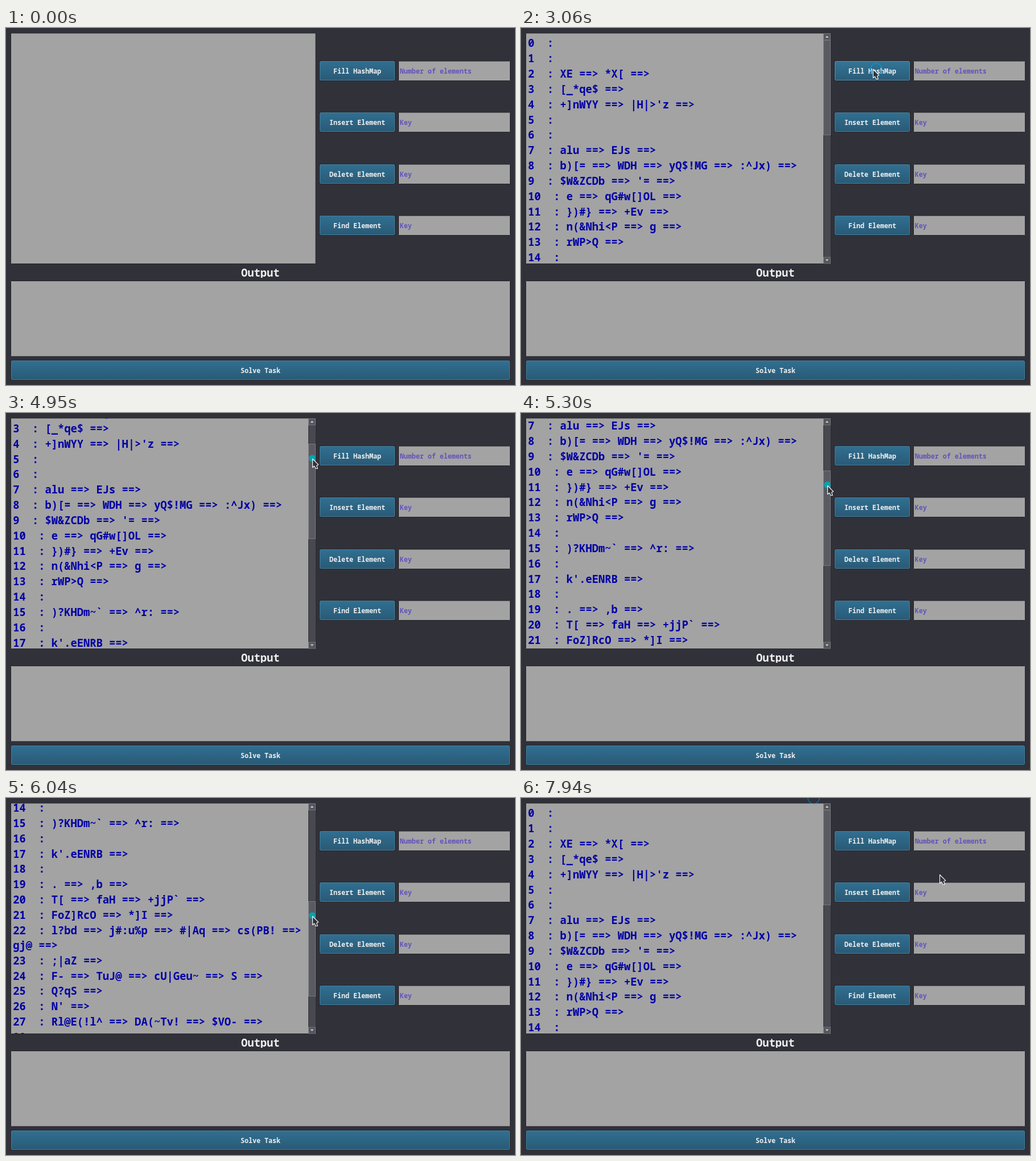
An HTML page that plays this animation: 894 px wide and 626 px high, repeating every 8000 ms.

```html
<!DOCTYPE html>
<html lang="en">
<head>
<meta charset="utf-8">
<title>HashMap demo</title>
<style>
html, body { margin: 0; width: 100%; height: 100%; overflow: hidden; background: #31313a; }
svg { display: block; }
text { font-family: "Noto Sans Mono", "DejaVu Sans Mono", monospace; font-weight: 700; white-space: pre; }
.small { font-size: 11.68px; }
.big { font-size: 18.78px; }
.label { fill: #f0f0f0; text-anchor: middle; }
.hint { fill: #6253bb; }
.typed { fill: #2410b0; }
.row { fill: #0000a5; }
.panel { fill: #a3a3a3; stroke: #24242a; }
.button { fill: url(#blue); stroke: #48809b; }
.button.hover { fill: url(#blueHover); stroke: #5795b2; }
</style>
</head>
<body>
<svg id="stage" width="894" height="626" viewBox="0 0 894 626">
  <defs>
    <linearGradient id="blue" x2="0" y2="1"><stop stop-color="#316f91"/><stop offset="1" stop-color="#295a76"/></linearGradient>
    <linearGradient id="blueHover" x2="0" y2="1"><stop stop-color="#347596"/><stop offset="1" stop-color="#2a5d79"/></linearGradient>
    <clipPath id="listClip"><rect x="9" y="9.5" width="522" height="403.5"/></clipPath>
    <clipPath id="titleClip"><rect x="400" y="416" width="100" height="22"/></clipPath>
  </defs>
  <rect width="894" height="626" fill="#31313a"/>
</svg>
<script>
const LOOP = 8000, FILL_AT = 2900, PRESS = 4700, RELEASE = 7700;
const MAX_SCROLL = 514, THUMB_TRAVEL = 213, ROW = 26.83;
const stage = document.getElementById("stage");

function add(tag, attrs, parent = stage, text) {
  const el = document.createElementNS("http://www.w3.org/2000/svg", tag);
  for (const k in attrs) el.setAttribute(k, attrs[k]);
  if (text !== undefined) el.textContent = text;
  parent.appendChild(el);
  return el;
}
const set = (el, attrs) => { for (const k in attrs) el.setAttribute(k, attrs[k]); };
const show = (el, on) => el.setAttribute("visibility", on ? "visible" : "hidden");
const clamp = (v, lo, hi) => Math.max(lo, Math.min(hi, v));
const panel = (x, y, w, h) => add("rect", { x: x - .5, y: y - .5, width: w + 1, height: h + 1, rx: 1, class: "panel" });

function button(x, y, w, label) {
  add("rect", { x: x - 1, y: y - 1, width: w + 2, height: 36, rx: 2, fill: "#25262d" });
  const box = add("rect", { x: x + .5, y: y + .5, width: w - 1, height: 33, rx: 1, class: "button" });
  add("text", { x: x + w / 2, y: y + 21.8, class: "small label" }, stage, label);
  return { box, x, y, w };
}

// Static window
panel(9, 9.5, 534.5, 403.5);
panel(9, 444, 876, 131.5);
add("text", { x: 446.7, y: 435.5, class: "big label", "clip-path": "url(#titleClip)" }, stage, "Output");
button(9, 583, 876, "Solve Task");

const actions = [["Fill HashMap", "Number of elements"], ["Insert Element", "Key"],
  ["Delete Element", "Key"], ["Find Element", "Key"]];
const controls = actions.map(([label, hint], i) => {
  const y = Math.round(58 + 90.35 * i);
  const btn = button(551, y, 132, label);
  const field = panel(690, y + .5, 195, 33.5);
  const text = add("text", { x: 691.7, y: y + 21.8, class: "small hint" }, stage, hint);
  return { btn, field, text };
});
const caret = add("rect", { x: 692, y: 67, width: 1, height: 16, fill: "#111" });

// Hash table listing
const buckets = ["", "", "XE *X[", "[_*qe$", "+]nWYY |H|>'z", "", "", "alu EJs",
  "b)[= WDH yQ$!MG :^Jx)", "$W&ZCDb '=", "e qG#w[]OL", "})#} +Ev", "n(&Nhi<P g", "rWP>Q", "",
  ")?KHDm~` ^r:", "", "k'.eENRB", "", ". ,b", "T[ faH +jjP`", "FoZ]RcO *]I",
  "l?bd j#:u%p #|Aq cs(PB! gj@", ";|aZ", "F- TuJ@ cU|Geu~ S", "Q?qS", "N'",
  "Rl@E(!l^ DA(~Tv! $VO-", "", "L,Qo ]g'QIThW", "R-sM:", "FEww*S$ )tYx<vz"];
const filled = add("g", {});
const view = add("g", { "clip-path": "url(#listClip)" }, filled);
const list = add("g", {}, view);
const WRAP_COL = 46;
let lineY = 33.4;
buckets.forEach((keys, i) => {
  const line = i + "  : " + keys.split(" ").filter(Boolean).map(k => k + " ==> ").join("");
  const put = s => add("text", { x: 12.2, y: lineY, class: "big row" }, list, s);
  put(line.slice(0, WRAP_COL));
  if (line.length > WRAP_COL) {
    lineY += 26.3;
    put(line.slice(WRAP_COL));
  }
  lineY += ROW;
});

// Scroll bar
add("rect", { x: 531, y: 9.5, width: 13, height: 403.5, fill: "#484850" }, filled);
add("path", { d: "M531.5 9.5V413", stroke: "#303037" }, filled);
const thumb = add("rect", { x: 531.5, y: 22, width: 12, height: 166, fill: "#5a5a62", stroke: "#77777e" }, filled);
[[9.5, "M534.5 17h6l-3 -3.5z"], [401.5, "M534.5 405.5h6l-3 3.5z"]].forEach(([y, d]) => {
  add("rect", { x: 531.5, y: y + .5, width: 12, height: 11, fill: "#55555d", stroke: "#74747b" }, filled);
  add("path", { d, fill: "#c6c6c9" }, filled);
});

// Pointer and click marks: [time, x, y]
const path = [[240, 800, 64], [700, 790, 70], [1070, 764, 76], [1200, 754, 93], [1300, 730, 95],
  [1500, 670, 84], [1680, 624, 72], [1839, 624, 72], [1840, 623, 71], [2790, 623, 71], [2900, 624, 72],
  [3010, 624, 72], [3060, 619, 72], [3300, 480, 110], [3590, 358, 130], [3650, 356, 131],
  [4000, 430, 100], [4420, 542, 46], [4460, 541, 45], [4640, 541, 45], [4700, 538, 47],
  [5300, 538, 127], [6040, 538, 207], [6280, 543, 238], [6630, 549, 271], [6720, 548, 276],
  [7040, 542, 200], [7310, 542, 200], [7600, 514, 0], [7720, 514, -4], [7940, 735, 134]];
const clicks = [[300, 800, 60], [2920, 624, 72], [7700, 514, 0]];
const RING_LIFE = 360;
const ring = add("circle", { fill: "none", stroke: "#0696dc", "stroke-width": 1.5 });
const dot = add("circle", { r: 6 });
const arrow = add("path", {
  d: "M.5 .5V15.5L3.6 13L6 17.5H9.2L7.6 12.2L10.7 10.7Z",
  fill: "#30343a", stroke: "#fff", "stroke-width": 1.1, "stroke-linejoin": "round"
});
const beam = add("path", { d: "M-3 -8H3M0 -8V8M-3 8H3", fill: "none", stroke: "#30343a", "stroke-width": 1.4 });

function pointerAt(t) {
  const i = path.findIndex(p => p[0] > t);
  if (i === 0) return path[0].slice(1);
  if (i < 0) return path[path.length - 1].slice(1);
  const [a, ax, ay] = path[i - 1], [b, bx, by] = path[i], f = (t - a) / (b - a);
  return [ax + (bx - ax) * f, ay + (by - ay) * f];
}

function draw(t) {
  const [x, y] = pointerAt(t), visible = t >= 240;
  const dragging = t >= PRESS && t < RELEASE;
  const inBox = (left, top, w) => x >= left && x <= left + w && y >= top && y <= top + 34;
  const overField = controls.some(c => inBox(690, c.btn.y, 195));

  // Number entry
  const focused = t >= 300 && t < 2790;
  const typed = t >= FILL_AT ? "" : t >= 840 ? "50" : t >= 700 ? "5" : "";
  const entry = controls[0].text;
  entry.textContent = typed || actions[0][1];
  entry.setAttribute("class", "small " + (typed ? "typed" : "hint"));
  controls[0].field.style.stroke = focused ? "#3b86a8" : "";
  caret.setAttribute("x", 692 + 7 * typed.length);
  const blinkStart = typed.length === 2 ? 840 : 300;
  show(caret, focused && Math.floor((t - blinkStart) / 500) % 2 === 0);

  controls.forEach(({ btn }) =>
    btn.box.classList.toggle("hover", visible && !dragging && inBox(btn.x, btn.y, btn.w)));

  // Listing follows the dragged thumb
  show(filled, t >= FILL_AT);
  const moved = dragging ? clamp(y - 47.5, 0, THUMB_TRAVEL) : 0;
  list.setAttribute("transform", `translate(0 ${-Math.round(moved * MAX_SCROLL / THUMB_TRAVEL)})`);
  thumb.setAttribute("y", Math.round(22 + moved) - .5);

  const click = clicks.find(c => t >= c[0] && t < c[0] + RING_LIFE);
  show(ring, !!click);
  if (click) {
    const age = t - click[0];
    set(ring, { cx: click[1], cy: click[2], r: 10 * Math.min(1, age / 100), opacity: 1 - (age / RING_LIFE) ** 2 });
  }
  show(dot, dragging);
  set(dot, { cx: x, cy: y - 1, fill: x > 545 ? "#1585c4" : "#06a3ae" });

  const place = `translate(${Math.round(x)} ${Math.round(y)})`;
  set(arrow, { transform: place });
  set(beam, { transform: place });
  show(arrow, visible && !(overField && !dragging));
  show(beam, visible && overField && !dragging);
}

const start = performance.now();
function tick() {
  draw((performance.now() - start) % LOOP);
  requestAnimationFrame(tick);
}
tick();
</script>
</body>
</html>
```
